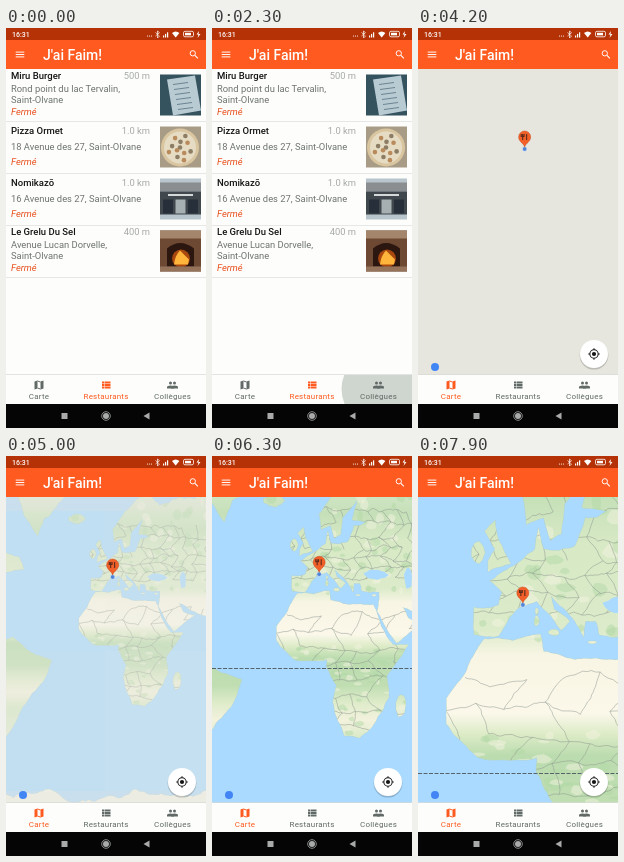
An HTML page for the animation above (8000 ms loop, 200 by 400 pixels).

```html
<!DOCTYPE html>
<html lang="fr">
<head>
<meta charset="utf-8">
<title>J'ai Faim!</title>
<style>
  html, body { margin: 0; width: 100%; height: 100%; overflow: hidden; background: #fdfdfd; }
  svg { display: block; width: 200px; height: 400px; }
  text { font-family: Roboto, "Noto Sans", sans-serif; white-space: pre; }
  .hand text { font-family: Lato, "Open Sans", sans-serif; font-style: italic; }
  .icon { fill: currentColor; }
  .line { fill: none; stroke: currentColor; stroke-width: 2; }
  #world path { vector-effect: non-scaling-stroke; }
</style>
</head>
<body>
<svg id="stage" viewBox="0 0 200 400" xmlns="http://www.w3.org/2000/svg"></svg>
<script>
const LOOP = 8000, STEP = 100;
const ORANGE = '#ff5a1f', GREY = '#616a66', PAPER = '#fdfefc', INK = '#161616';

let seed = 7;
const rnd = () => (seed = seed * 16807 % 2147483647) / 2147483647;
const jitter = size => (rnd() - .5) * 2 * size;
const range = n => [...Array(n).keys()];
const repeat = (n, make) => range(n).map(make).join('');
const clamp = v => Math.min(1, Math.max(0, v));

// Markup helpers
const text = (x, y, s, size, fill, more = '') => `<text x="${x}" y="${y}" font-size="${size}" fill="${fill}" ${more}>${s}</text>`;
const rect = (x, y, w, h, fill, more = '') => `<rect x="${x}" y="${y}" width="${w}" height="${h}" fill="${fill}" ${more}/>`;
const dot = (x, y, r, fill, more = '') => `<circle cx="${x}" cy="${y}" r="${r}" fill="${fill}" ${more}/>`;
const path = (d, fill, more = '') => `<path d="${d}" fill="${fill}" ${more}/>`;
const line = (d, width = 2) => `<path class="line" d="${d}" style="stroke-width:${width}"/>`;
const ring = (r, width = 2) => `<circle class="line" cx="12" cy="12" r="${r}" style="stroke-width:${width}"/>`;
const group = (id, body, more = '') => `<g id="${id}" ${more}>${body}</g>`;
const rule = (x, y, w) => rect(x, y, w, .7, '#dde0de');
const mid = 'text-anchor="middle"', bold = 'font-weight="500"';

// Icons on a 24 unit square
const starPoint = i => {
  const r = i % 2 ? 4.2 : 10.500, a = i * Math.PI / 5;
  return `${12 + r * Math.sin(a)} ${12.500 - r * Math.cos(a)}`;
};
const person = x => `<circle cx="${x}" cy="8" r="3"/><path d="M${x - 7} 19v-2.500q0-3.500 7-3.500t7 3.500V19z"/>`;
const ICONS = {
  menu: line('M3 7H21M3 12H21M3 17H21'),
  search: '<circle class="line" cx="9.500" cy="9.500" r="5.500"/>' + line('M14 14l6 6', 2.300),
  map: '<path d="M3 5l6-2V19l-6 2z"/><path d="M15 5l6-2V19l-6 2z"/>' + line('M9 4l6 2.100M9 18l6 2.100'),
  list: repeat(3, i => `<path d="M4 ${5 + 5 * i}h4v4h-4zM9 ${5 + 5 * i}h12v4h-12z"/>`),
  people: person(8) + person(16),
  phone: line('M6 4Q6 18 20 18', 3) + line('M5.500 3V9M15 18.500H21', 4.500),
  star: `<path d="M${range(10).map(starPoint).join('L')}Z"/>`,
  globe: ring(9) + '<path d="M4 9l6 6v5Q4 18 4 9zM14 3v4l-6 4v2h6v4h4l2-4-2-7z"/>',
  check: dot(12, 12, 10, 'currentColor') + path('M6 12l4 4 8-8', 'none', 'stroke="#fff" stroke-width="2"'),
  locate: ring(8) + '<circle cx="12" cy="12" r="4"/>' + line('M12 1v3M12 20v3M1 12h3M20 12h3')
};
const icon = (name, x, y, size, more = '') =>
  `<g class="icon" transform="translate(${x - size / 2} ${y - size / 2}) scale(${size / 24})" ${more}>${ICONS[name]}</g>`;

// Web mercator, 100 units per radian
const rad = deg => deg * Math.PI / 180;
const mercX = lon => 100 * rad(lon);
const mercY = lat => -100 * Math.asinh(Math.tan(rad(lat)));

// Splits a straight edge again and again, pushing each middle aside
function rough(a, b, bend = .06) {
  const dx = b[0] - a[0], dy = b[1] - a[1];
  if (Math.hypot(dx, dy) < 1.5) return [a];
  const push = jitter(bend), m = [(a[0] + b[0]) / 2 - dy * push, (a[1] + b[1]) / 2 + dx * push];
  return [...rough(a, m, bend), ...rough(m, b, bend)];
}
const toPath = points => 'M' + points.map(([lon, lat]) => `${mercX(lon).toFixed(2)} ${mercY(lat).toFixed(2)}`).join('L');
const coast = corners => toPath(corners.flatMap((p, i) => rough(p, corners[(i + 1) % corners.length]))) + 'Z';
const shore = s => coast(s.split(' ').map(p => p.split(',').map(Number)));
const blob = (lon, lat, w, h) => coast(range(9).map(i =>
  [lon + w * Math.cos(i * .7) * (1 + jitter(.15)), lat + h * Math.sin(i * .7) * (1 + jitter(.15))]));

const LAND = [
  // Africa
  shore('-6,36 10,37 11,33 20,31 33,31 37,21 43,12 51,12 40,-4 41,-15 33,-28 26,-34 18,-33 12,-17 14,-9 9,0 9,4.5 -8,4.5 -17,14 -17,21 -10,31'),
  // Europe and western Asia
  shore('-9,37 -9,43 -2,43.5 -1,46 -4.5,48.3 2,51 8.5,54 9.5,57.5 11,54 20,54.5 23,59 30,60 30,68 75,73 75,20 57,25.5 48,30 51,25 59,22.5 45,12.8 35,28 36,36.5 27,37 26,40 23,40 22.500,36.5 20,40 13,45.5 14,42.5 18.5,40 16,38 12,42 9,44.3 4,43 -2,36.7'),
  // Scandinavia, Britain
  shore('31,60 22,60.5 25,65.5 17,61 16,56.5 13,55.5 11,59 6,58 5,62 13,67 27,71 41,67'),
  shore('-5,50 1.5,51.5 -2,55.5 -3,58.6 -6,57 -3,54 -5,52'),
  // South America, Greenland, Newfoundland, Antarctica
  shore('-50,0 -35,-6 -39,-17 -48,-27 -68,-52 -80,-40 -80,5 -60,9'),
  shore('-53,66 -44,60 -40,65 -24,71 -60,76'), shore('-56,52 -53,47 -70,44 -70,55'), shore('-80,-66 80,-66 80,-82 -80,-82'),
  // Ireland, Iceland, Sicily, Sardinia, Corsica, Crete, Cyprus, Madagascar
  blob(-8, 53.4, 1.9, 1.8), blob(-18.5, 65, 5, 1.3), blob(14, 37.5, 1.5, .7), blob(9, 40, .7, 1.1),
  blob(9, 42.2, .5, .7), blob(25, 35.2, 1.3, .3), blob(33.3, 35.1, 1, .4), blob(47, -19, 2.3, 6)
];
const SEAS = [blob(34, 43.3, 6, 1.9), blob(51, 42, 2, 4.5)];

// Ground colour follows latitude
const NORTH = mercY(76), SOUTH = mercY(-82);
const GROUND = { 76: '#f3f4ea', 62: '#c5e0b8', 55: '#d7e9c5', 38: '#dcebca', 32: '#f8f5e4', 17: '#fbf8ea', 11: '#dcebc6',
  5: '#bbdcaf', '-9': '#c0deb2', '-18': '#dfeccb', '-26': '#f3f2dd', '-35': '#d5e8c4', '-64': '#f3f4ea' };
const ground = () => `<linearGradient id="ground" gradientUnits="userSpaceOnUse" x1="0" x2="0" y1="${NORTH}" y2="${SOUTH}">` +
  Object.entries(GROUND).map(([lat, color]) => [(mercY(+lat) - NORTH) / (SOUTH - NORTH), color]).sort((a, b) => a[0] - b[0])
    .map(([at, color]) => `<stop offset="${at}" stop-color="${color}"/>`).join('') + '</linearGradient>';

// Patches of wood and field outside the desert
function patch() {
  const lon = -20 + 90 * rnd(), lat = -34 + 104 * rnd(), wood = rnd() < .55;
  if (lat > 11 && lat < 35) return '';
  return path(blob(lon, lat, 1 + 2 * rnd(), .5 + rnd()), wood ? '#b4d9a8' : '#f4f3df', 'opacity=".5"');
}

// Frontiers: a jittered brick wall of countries
function frontiers(south, north, w, h) {
  const cols = Math.ceil(90 / w), rows = Math.ceil((north - south) / h);
  const nodes = range(rows).map(j => range(cols).map(i =>
    [-19 + (i + j % 2 / 2) * w + jitter(w / 4), south + j * h + jitter(h / 4)]));
  let d = '';
  const edge = (a, b) => { if (a && b && rnd() > .12) d += toPath([...rough(a, b, .1), b]); };
  nodes.forEach((row, j) => row.forEach((node, i) => {
    edge(node, row[i + 1]);
    edge(node, nodes[j + 1]?.[i]);
  }));
  return d;
}

const world = () => ground() + `<clipPath id="coast">${LAND.map(d => `<path d="${d}"/>`).join('')}</clipPath>` +
  group('world', path(LAND.join(''), 'none', 'stroke="#b3d3d0" stroke-width="1"') +
    `<g clip-path="url(#coast)">${rect(-150, NORTH, 300, SOUTH - NORTH, 'url(#ground)') + repeat(300, patch)}` +
    path(frontiers(-30, 34, 10, 8) + frontiers(42, 64, 7, 3.5), 'none', 'stroke="#8b958d" stroke-width=".5"') + '</g>' +
    path(SEAS.join(''), '#aadaff'));

const VEIL_X = [0, 99, 200], VEIL_Y = [41, 55, 195, 335, 347];
const veil = () => repeat(4, j => repeat(2, i =>
  rect(VEIL_X[i], VEIL_Y[j], VEIL_X[i + 1] - VEIL_X[i], VEIL_Y[j + 1] - VEIL_Y[j], '#e7e6de')));

const mapPage = () => group('mapPage',
  rect(0, 41, 200, 306, '#aadaff') + world() +
  '<path id="equator" stroke="#56636a" stroke-dasharray="4 1.500"/>' + group('veil', veil()) +
  group('pin', dot(0, 0, 2.3, '#4f86d8', 'stroke="#dfeaf5" stroke-width=".6"') +
    path('M0-2C-1-6-6-7-6-12A6 6 0 0 1 6-12C6-7 1-6 0-2Z', '#f2602a', 'stroke="#c84a1c" stroke-width=".5"') +
    path('M-2-15v6M-3.400-15v2.500h2.800V-15M2-9v-6', 'none', 'stroke="#5b2a1a" stroke-width="1.100"')) +
  dot(17, 339, 4, '#4285f4') +
  dot(176, 327.2, 14.4, '#000', 'opacity=".18"') + dot(176, 326, 14, '#fff') + icon('locate', 176, 326, 12.5, 'color="#151515"'));

const ROWS = [
  ['Miru Burger', '500 m', 'Rond point du lac Tervalin,', 'Saint-Olvane'],
  ['Pizza Ormet', '1.0 km', '18 Avenue des 27, Saint-Olvane'],
  ['Nomikazō', '1.0 km', '16 Avenue des 27, Saint-Olvane'],
  ['Le Grelu Du Sel', '400 m', 'Avenue Lucan Dorvelle,', 'Saint-Olvane']
];
const THUMBS = [
  () => rect(0, 0, 41, 41, '#35525f') + path('M7 5 35 1 41 36 13 41Z', '#b9cbd2') +
    repeat(6, i => path(`M${13 + i} ${10 + 5 * i}l15-2`, 'none', 'stroke="#6b8492"')),
  () => rect(0, 0, 41, 41, '#a99c86') + dot(20, 21, 19, '#d9c6a0') + dot(20, 21, 16, '#e6dcc4') +
    repeat(12, i => dot(20 + 4 * Math.sqrt(i) * Math.cos(i * 2.4), 21 + 4 * Math.sqrt(i) * Math.sin(i * 2.4), 2.3, i % 2 ? '#b98a5b' : '#8c7d64')),
  () => rect(0, 0, 41, 41, '#b9c5cc') + rect(0, 4, 41, 9, '#8a8e90') + rect(0, 13, 41, 23, '#40474d') +
    repeat(3, i => rect(3 + 12.500 * i, 21, 10, 14, i === 1 ? '#a6afb2' : '#27303a')) + rect(8, 15.5, 25, 2, '#d5d8d8'),
  () => rect(0, 0, 41, 41, '#6d4833') + rect(0, 0, 41, 8, '#a3866b') + path('M7 36V18Q20 7 34 18V36Z', '#2c1710') +
    dot(21, 28, 9, '#a8480f') + path('M14 34Q15 25 20 20L29 29 28 34Z', '#ffb43c') + rect(0, 36, 41, 5, '#94735a')
];
function row([name, far, ...address], i) {
  const y = 41 + 52 * i, [a, b, c] = address[1] ? [9.7, 22.5, 45.6] : [12.7, 28.5, 43.8];
  return text(5, y + a, name, 9.5, INK, bold) + text(144, y + a, far, 9.4, '#a5a9a7', 'text-anchor="end"') +
    address.map((s, n) => text(5, y + b + n * 11, s, 9.4, '#6d726f')).join('') +
    text(5, y + c, 'Fermé', 9.4, '#e84e1b', 'font-style="italic"') +
    rule(0, y + 52, 200) + `<g transform="translate(154 ${y + 5.5})">${THUMBS[i]()}</g>`;
}
const listPage = () => group('listPage', rect(0, 41, 200, 306, PAPER) +
  rect(0, 41, 200, 52, '#dfe2df', 'id="press"') + ROWS.map(row).join(''));

const FRIEND = 'Ondine Falverstam';
const avatar = y => dot(23, y, 18, '#ced5d6') + dot(23, y - 5, 6, '#fff') +
  path(`M10 ${y + 12.4}Q11 ${y + 6} 20 ${y + 4}V${y}h6v4Q35 ${y + 6} 36 ${y + 12.4}A18 18 0 0 1 10 ${y + 12.4}Z`, '#fff');
const friendPage = () => group('friendPage', rect(0, 41, 200, 306, PAPER) +
  dot(23, 64, 18, '#43606a') + text(23, 71.5, 'M', 21, '#fff', mid) +
  text(46, 67.5, "Milan Torvec n'as pas encore décidé", 9.4, '#c6c9c7', 'font-style="italic"') + rule(46, 83, 149) +
  avatar(109.5) + text(46, 108, FRIEND + ' mange à Miru', 9.4, INK) + text(46, 119, 'Burger', 9.4, INK) + rule(46, 130, 149));

const TABS = [['map', 'Carte', 33], ['list', 'Restaurants', 100], ['people', 'Collègues', 166.5]];
const status = () => text(6, 9, '16:31', 7, '#fff', bold) + repeat(3, i => dot(141.5 + 2 * i, 8, .6, '#fff')) +
  path('M149.500 4.500l4 3.500-2 2V3l2 1.700-4 3.300', 'none', 'stroke="#fff" stroke-width=".7"') +
  repeat(3, i => rect(157 + 2 * i, 7.5 - 1.6 * i, 1.2, 2 + 1.6 * i, '#fff')) +
  path('M166 5Q169.700 1.800 173.400 5L169.700 9.500Z', '#fff') +
  rect(177.5, 3.3, 10, 5.5, 'none', 'rx="1.500" stroke="#fff" stroke-width=".8"') + rect(179, 4.8, 6, 2.5, '#fff') +
  path('M193 3l-2.500 3.500h2L191.500 10l3-4h-2z', '#fff');
const keys = fill => rect(55.5, 385, 6, 6, fill) + dot(100, 388, 3, fill) +
  dot(100, 388, 4.3, 'none', `stroke="${fill}" stroke-width=".8"`) + path('M137.500 388l6-3.500v7z', fill);
const bars = () => rect(0, 0, 200, 12, '#b43206') + rect(0, 12, 200, 29, ORANGE) + status() +
  icon('menu', 14, 26.5, 11.5, 'color="#fff"') + icon('search', 188, 26.5, 11.5, 'color="#fff"') +
  text(37, 32, '', 14, '#fff', bold + ' id="title"') +
  rect(0, 346.3, 200, 1, '#d8dbd8') + rect(0, 347, 200, 29, PAPER) +
  '<clipPath id="tabClip"><rect y="347" width="200" height="29"/></clipPath>' +
  '<circle id="ripple" cy="361" fill="#cfd5cf" clip-path="url(#tabClip)"/>' +
  TABS.map(([name, label, x], i) => group('tab' + i, icon(name, x, 357, 12) +
    text(x, 370.8, label, 8, 'currentColor', mid + ' letter-spacing=".2"'))).join('') +
  rect(0, 376, 200, 24, '#050505') + keys('#a9abaa');

// Handwritten card on the detail page
const DISHES = { Cheese: '7,50€', Basic: '9€', Italien: '12€', Cheval: '10€', Raclette: '10€', 'Chèvre': '11€',
  'Méga-Cheval': '12€', 'Foie Gras': '12€' };
const tilt = (x, y, s, size, more = '') => text(x, y, s, size, '#1f2d38', `transform="rotate(-5 ${x} ${y})" ${more}`);
const heading = 'font-weight="700" text-decoration="underline"';
const card = () => '<linearGradient id="sheet" x2=".7" y2="1"><stop stop-color="#93b3c8"/><stop offset=".5" stop-color="#a6c5d8"/><stop offset="1" stop-color="#86a9c0"/></linearGradient>' +
  rect(0, 0, 200, 142, 'url(#sheet)') + path('M0 10H8L27 142H0Z', '#c3d0d6') + path('M0 32 5 30 22 142H0Z', '#2d4452') +
  path('M188 0H200V95Z', '#3a5361') +
  group('ink', tilt(50, 7, 'FORMULES', 18, 'font-weight="700"') + tilt(75, 26, 'Burgers + frites', 10, heading) +
    Object.entries(DISHES).map(([name, cost], i) => tilt(40 + i * 1.1, 38 + i * 9.4, name, 7.6) +
      tilt((i ? 164 : 154) + i * 1.3, 29.5 + i * 8.8, cost, 7)).join('') +
    tilt(87, 119, 'Paninis + frites', 11, heading) + tilt(50, 137, 'Savoyard', 8.2) +
    repeat(3, i => tilt(185 + 2 * i, 118 + 10 * i, '8€', 7)), 'class="hand"');
const action = (name, label, x) => icon(name, x, 206.5, 13) + text(x, 229.3, label, 9.5, 'currentColor', mid + ' font-weight="700"');
const detailPage = () => group('detailPage', rect(0, 0, 200, 400, '#fdfdfd') + card() +
  `<g opacity=".75">${status()}</g>` + rect(0, 142, 200, 47, ORANGE) +
  text(5, 160, 'Miru Burger', 11.5, '#fff', bold) +
  text(5, 173, 'Rond point du lac Tervalin, Saint-Olvane', 9.5, '#fff') +
  dot(181, 144.2, 14.3, '#000', 'opacity=".15"') + dot(181, 143, 14, '#fdfefc') + icon('check', 181, 143, 19, 'id="joinIcon"') +
  `<g color="${ORANGE}">${action('phone', 'APPEL', 34)}${action('star', 'LIKE', 100)}${action('globe', 'SITE WEB', 166)}</g>` + rule(0, 234.5, 200) +
  group('joined', avatar(257.5) + text(46, 262, FRIEND + ' se joint à vous!', 9.5, INK)) + keys('#f0f1f0'));

document.getElementById('stage').innerHTML =
  rect(0, 0, 200, 400, PAPER) + mapPage() + listPage() + friendPage() + bars() + detailPage();

const $ = id => document.getElementById(id);
const show = (id, on) => $(id).setAttribute('display', on ? 'inline' : 'none');
const tiles = [...$('veil').children];

// time, pixels per radian, x of Greenwich, y of the equator
const CAMERA = [[5400, 87.6, 99, 195], [6300, 111, 97.5, 212], [7100, 130, 95.5, 239], [7900, 199, 87.5, 317]];
const TAPS = [[2200, 166.5], [3200, 33]];

function camera(t) {
  const i = Math.max(1, CAMERA.findIndex(c => c[0] >= t));
  const a = CAMERA[i - 1], b = CAMERA[i], u = clamp((t - a[0]) / (b[0] - a[0]));
  const k = a[1] * (b[1] / a[1]) ** u, v = (k - a[1]) / (b[1] - a[1]);
  return [k, a[2] + (b[2] - a[2]) * v, a[3] + (b[3] - a[3]) * v];
}

function drawMap(t) {
  const [k, x, y] = camera(t);
  $('world').setAttribute('transform', `translate(${x} ${y}) scale(${k / 100})`);
  $('pin').setAttribute('transform', `translate(${x + k * mercX(5) / 100} ${y + k * mercY(43.5) / 100})`);
  show('pin', t >= 3700);
  $('equator').setAttribute('d', `M0 ${Math.floor(y) + .5}H200`);
  show('equator', t >= 5300);
  tiles.forEach((tile, n) => {
    const j = n >> 1, lag = j % 3 ? 40 * (j - 1 + n % 2) : 150;
    tile.setAttribute('opacity', clamp(1 - (t - 4360 - lag) / 1000));
  });
}

function draw(t) {
  const tab = t < 2500 ? 1 : t < 3500 ? 2 : 0;
  show('mapPage', tab === 0);
  show('listPage', tab === 1);
  show('friendPage', tab === 2);
  show('press', t >= 100 && t < 500);
  $('title').textContent = tab === 2 ? 'Collègue connectés' : "J'ai Faim!";
  TABS.forEach((_, i) => $('tab' + i).setAttribute('color', i === tab ? ORANGE : GREY));

  const tap = TAPS.find(([start]) => t >= start && t < start + 300);
  show('ripple', tap);
  if (tap) {
    $('ripple').setAttribute('cx', tap[1]);
    $('ripple').setAttribute('r', 14 + (t - tap[0]) * .23);
  }

  const open = clamp((t - 200) / 300) * clamp((1800 - t) / 200);
  show('detailPage', open > 0);
  $('detailPage').setAttribute('opacity', open);
  $('detailPage').setAttribute('transform', `translate(0 ${(1 - open) ** 2 * 30})`);
  show('joined', t >= 1200);
  $('joinIcon').setAttribute('color', t >= 1100 ? '#86c9b4' : '#a3a8a6');
  if (tab === 0) drawMap(t);
}

const begin = performance.now();
function tick() {
  const t = (performance.now() - begin) % LOOP;
  draw(Math.floor(t / STEP) * STEP);
  requestAnimationFrame(tick);
}
tick();
</script>
</body>
</html>
```
